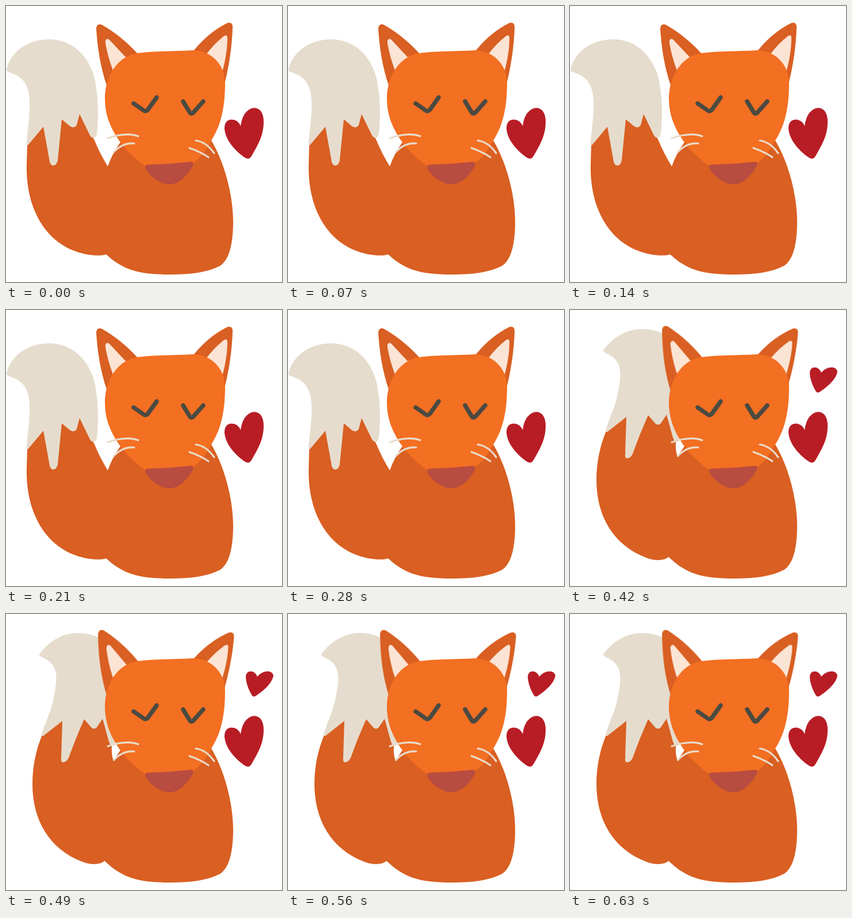
Write an HTML page that moves like this. It is 480 px wide and 480 px high and loops after 700 ms.

```html
<!DOCTYPE html>
<html lang="en">
<head>
<meta charset="utf-8">
<title>Fox wagging its tail</title>
<style>
  html, body { margin: 0; width: 100%; height: 100%; overflow: hidden; background: #fff; }
  svg { display: block; width: 100vw; height: 100vh; }
  .fur { fill: #d95f22; }
  .face { fill: #f36f21; }
  .cream { fill: #e6dccd; }
  .inner { fill: #fce4d5; }
  .heart { fill: #b81d25; }
  .nose { fill: #b94c40; stroke: #b94c40; stroke-width: 8; stroke-linejoin: round; }
  .eyes, .whiskers { fill: none; stroke-linecap: round; stroke-linejoin: round; }
  .eyes { stroke: #4b4a42; stroke-width: 7.5; }
  .whiskers { stroke: #e9dccb; stroke-width: 3.2; }

  /* Two poses, swapped halfway through the loop */
  .down, .up, .ear { animation: 700ms step-end infinite; }
  .down { animation-name: hide; }
  .up { animation-name: show; }
  .ear { animation-name: tilt; }
  .left { transform-origin: 245px 97px; }
  .right { transform-origin: 335px 85px; }
  @keyframes hide { 0% { opacity: 1; } 50%, 100% { opacity: 0; } }
  @keyframes show { 0% { opacity: 0; } 50%, 100% { opacity: 1; } }
  @keyframes tilt { 0% { transform: none; } 50%, 100% { transform: rotate(3deg); } }
</style>
</head>
<body>
<svg viewBox="0 0 480 480">
  <g class="down">
    <path class="fur" d="M37 238L64 205L130 185L154 234Q163 256 177 279L215 380L175 432C160 436 139 433 122 427C67 408 34 350 36 275Z"/>
    <path class="cream" d="M1 110C8 80 37 58 75 58C118 58 144 90 153 122C160 148 162 192 158 222C157 231 149 231 146 225L128 188L123 207C120 212 115 212 110 208L97 197L90 268C88 280 78 280 76 271L65 210L39 241Q35 244 36 237C37 220 42 190 41 165C39 125 20 121 3 114Q0 112 1 110Z"/>
  </g>
  <g class="up">
    <path class="fur" d="M63 210L98 183L168 182L184 230Q183 245 187 255L215 380L172 429C165 436 148 437 133 431C75 409 46 358 46 296C46 265 52 237 63 210Z"/>
    <path class="cream" d="M58 70C76 45 101 33 126 33C139 33 151 36 161 41L190 90V215Q190 227 186 230Q182 230 179 222L168 182L158 197Q153 202 148 197L136 183Q122 214 109 250Q105 258 99 258Q95 257 96 250L98 186L65 212Q61 213 63 206C69 186 78 170 82 150C88 122 90 105 83 92C76 80 69 79 59 73Q57 72 58 70Z"/>
  </g>

  <path class="fur" d="M199 237L356 232C382 275 396 335 395 381C394 419 387 442 372 452C351 463 322 467 285 467C230 467 202 459 171 429L160 340L177 279Q185 256 199 237Z"/>

  <g class="ear left">
    <path class="fur" d="M157 40C157 32 163 30 169 34C190 46 211 63 228 82L240 120L180 150L175 138C164 105 159 72 157 40Z"/>
    <path class="inner" d="M173 65C172 57 177 55 181 60L210 91L200 125L186 112Q177 88 173 65Z"/>
  </g>
  <g class="ear right">
    <path class="fur" d="M327 77C345 55 364 40 384 30C391 27 395 31 394 39C393 71 388 103 381 132L370 140L320 110Z"/>
    <path class="inner" d="M349 83C358 71 368 61 378 53Q385 48 385 56C385 76 381 97 376 115L350 125Z"/>
  </g>

  <path class="face" d="M228 82C260 78 290 79 325 77C357 77 381 103 381 133C381 174 375 206 357 234C347 253 335 267 322 277L245 280C227 269 210 252 199 237C180 211 172 187 172 160C173 119 196 87 228 82Z"/>
  <path class="nose" d="M246 280Q284 279 322 275C318 284 310 293 302 300Q286 311 269 302C259 297 250 289 246 280Z"/>
  <path class="eyes" d="M222 169.500L238 180.500Q243 185 247 180L262 159M308 166L319 184Q322 190 327 184L343 166"/>
  <path class="whiskers" d="M177 230Q209 219 230 226.500M187.500 254Q203 237 223 239M330 234Q348 236 362 256M319 247Q337 253 352 263"/>

  <path class="heart" d="M408 209C404 195 379 191 380 214C382 235 401 254 416 264Q423 268 427 261C440 239 449 222 448 198C447 180 436 175 427 178C414 183 410 196 408 209Z"/>
  <path class="heart up" d="M437 109C433 97 417 96 417 110C418 124 424 135 428 142Q431 145 435 142C447 134 463 121 465 107C463 97 447 97 437 109Z"/>
</svg>
</body>
</html>
```
